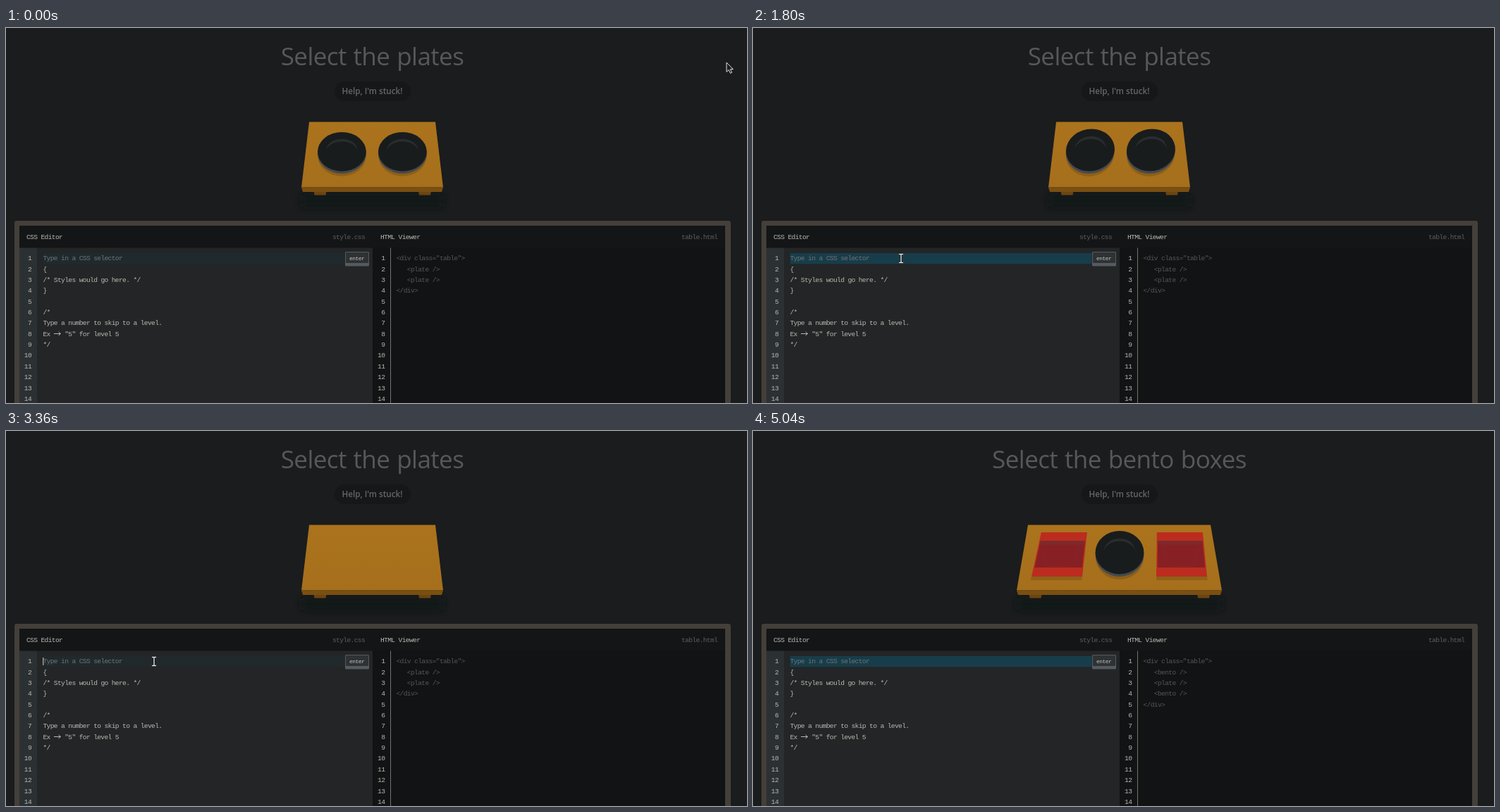
These frames come from a looping animation (1051 by 533 pixels, 5.1 s). An HTML page:

```html
<!DOCTYPE html>
<html lang="en">
<head>
<meta charset="utf-8">
<title>Select the plates</title>
<style>
html, body { margin: 0; width: 100%; height: 100%; overflow: hidden; background: #1a1c1d; }
svg { display: block; width: 100%; height: 100%; }
text { white-space: pre; }
.mono { font: 9.6px "Liberation Mono", "DejaVu Sans Mono", monospace; letter-spacing: -.64px; }
.small { font-size: 8px; letter-spacing: -.53px; }
.title { font: 35px "Open Sans", "Noto Sans", sans-serif; letter-spacing: -.55px; word-spacing: 1.3px; }
.help { font: 600 11.7px "Open Sans", "Noto Sans", sans-serif; }
</style>
</head>
<body>
<svg viewBox="0 0 1051 533" xmlns="http://www.w3.org/2000/svg">
  <defs>
    <filter id="soft" x="-20%" y="-150%" width="140%" height="400%"><feGaussianBlur stdDeviation="5"/></filter>
    <linearGradient id="wood" x1="0" y1="0" x2="0" y2="1">
      <stop offset="0" stop-color="#ab731c"/><stop offset="1" stop-color="#a66f1c"/>
    </linearGradient>
    <g id="plate">
      <ellipse cy="-27" rx="34" ry="31" fill="#8f5f17"/>
      <ellipse cy="-31.5" rx="34.5" ry="31.5" fill="#454a4e"/>
      <ellipse cy="-34.3" rx="34.4" ry="30.7" fill="#191c1d"/>
      <path d="M-22.5 -37C-19 -60 19 -60 22.5 -37C15 -55 -15 -55 -22.5 -37Z" fill="#292d2e"/>
    </g>
    <g id="bento">
      <path d="M-37.5 0H34.5L34 5H-38.5Z" fill="#8f6119"/>
      <path d="M-27.5 -64.3H37.5L34.5 0H-37.5Z" fill="#bb2c1f"/>
      <path d="M-27.8 -52H35.4L33.6 -13.3H-33.9Z" fill="#862024"/>
      <path d="M-27.8 -52H35.4L35.1 -46.5H-28.7Z" fill="#7d2a2c"/>
      <path d="M-26 -45L-16 -15H17L29 -45" fill="none" stroke="#8d2529" stroke-width=".7"/>
    </g>
    <path id="ibar" d="M-3 -6H3M0 -6V6M-3 6H3"/>
  </defs>
  <rect width="1051" height="533" fill="#1a1c1d"/>
  <text id="title" class="title" x="519.5" y="53" text-anchor="middle" fill="#56585a"></text>
  <rect x="466" y="76" width="108" height="28" rx="14" fill="#151718"/>
  <text class="help" x="519.5" y="94" text-anchor="middle" fill="#656769">Help, I'm stuck!</text>
  <g id="table"></g>
  <g id="items"></g>
  <rect x="12" y="274" width="1016" height="270" rx="3" fill="#443f39"/>
  <rect x="19" y="281" width="1001" height="252" fill="#131516"/>
  <rect x="19" y="312.5" width="25" height="221" fill="#2b3033"/>
  <rect x="44" y="312.5" width="476" height="221" fill="#232526"/>
  <rect x="520" y="312.5" width="500" height="221" fill="#111314"/>
  <rect x="545" y="312.5" width="1" height="221" fill="#77746c"/>
  <rect id="glow" x="52.5" y="320" width="428" height="15.3" fill="#17414f"/>
  <g id="code"></g>
  <g id="html"></g>
  <text id="input" class="mono" x="52.5" y="330.3"></text>
  <rect id="caret" y="322" width="1" height="11" fill="#d8d8d0"/>
  <g id="enter">
    <rect x="481" y="318" width="34" height="20.5" rx="1.5" fill="#555b5f"/>
    <rect x="482" y="319" width="32" height="15" rx="1" fill="#2e3234"/>
    <text class="mono small" x="487" y="329.5" fill="#c2c2ba">enter</text>
  </g>
  <path id="arrow" d="M0 0V13.4L3.1 10.5L5.4 15.3L7.6 14.3L5.4 9.6H9.4Z" fill="#191b1c" stroke="#e2e2e2"/>
  <g id="beam" fill="none">
    <use href="#ibar" stroke="#0b0c0c" stroke-width="3"/>
    <use href="#ibar" stroke="#e8e8e8" stroke-width="1.4"/>
  </g>
</svg>
<script>
const LOOP = 5100, STEP = 60, LINE = 15.35;
const ENTER = 2940, LOAD = 3960, SWAY = 484;
const LIGHT = '#b9b9b1', DIM = '#54585a', FILE = '#5c6061';
const $ = id => document.getElementById(id);
const clamp = v => Math.max(0, Math.min(1, v));
const span = (t, a, b) => clamp((t - a) / (b - a));
const ease = u => u * u * (3 - 2 * u);
const mix = (a, b, u) => a + (b - a) * u;
const show = (el, on) => el.setAttribute('visibility', on ? 'visible' : 'hidden');
const mono = (s, x, y, fill, anchor = 'start') =>
  `<text class="mono" x="${x}" y="${y}" fill="${fill}" text-anchor="${anchor}">${
    String(s).replace(/</g, '&lt;').replace(/>/g, '&gt;')}</text>`;
const rowY = i => 330.3 + i * LINE;

const levels = [
  { title: 'Select the plates', top: [430, 609], bottom: [419, 620], wanted: 'plate',
    items: [['plate', 476.4], ['plate', 562.4]] },
  { title: 'Select the bento boxes', top: [390, 649], bottom: [374, 665], wanted: 'bento',
    items: [['bento', 432.5], ['plate', 520], ['bento', 606.5, -1]] }
];

function buildEditor() {
  const lines = ['', '{', '/* Styles would go here. */', '}', '', '/*',
    'Type a number to skip to a level.', 'Ex', '*/'];
  let out = mono('CSS Editor', 29, 300, LIGHT) + mono('style.css', 463, 300, FILE)
    + mono('HTML Viewer', 531, 300, LIGHT) + mono('table.html', 958, 300, FILE);
  for (let i = 0; i < 14; i++) {
    out += mono(i + 1, 36, rowY(i), LIGHT, 'end') + mono(i + 1, 537.3, rowY(i), LIGHT, 'end');
    if (lines[i]) out += mono(lines[i], 52.5, rowY(i), LIGHT);
  }
  out += mono('"5" for level 5', 83.2, rowY(7), LIGHT);
  out += `<path d="M68 434.5H77M74.5 432L77.5 434.5L74.5 437" fill="none" stroke="${LIGHT}"/>`;
  $('code').innerHTML = out;
}

function buildLevel({ title, top: [a, b], bottom: [c, d], items }) {
  const leg = x => `<path d="M${x} 232H${x + 18}L${x + 17} 237.5H${x + 1}Z" fill="#6b4510"/>`;
  $('title').textContent = title;
  $('table').innerHTML =
    `<rect x="${c}" y="238" width="${d - c}" height="16" fill="#101213" opacity=".8" filter="url(#soft)"/>`
    + leg(c + 17.5) + leg(d - 35)
    + `<path d="M${a} 133.5H${b}L${d} 226.5H${c}Z" fill="url(#wood)"/>`
    + `<path d="M${c} 226.5H${d}L${d - 2} 233H${c + 2}Z" fill="#7a4f12"/>`;
  $('items').innerHTML = items.map(([kind, , flip = 1]) =>
    `<g><use href="#${kind}" transform="scale(${flip} 1)"/></g>`).join('');
  const tags = ['<div class="table">', ...items.map(([kind]) => `   <${kind} />`), '</div>'];
  $('html').innerHTML = tags.map((s, i) => mono(s, 553.5, rowY(i), DIM)).join('');
}

// Lean and squash of the pieces to be picked
function sway(phase, amount) {
  const a = 2 * Math.PI * phase;
  return {
    lean: -Math.sin(a) * amount,
    tall: 1 - (.02 + .072 * Math.cos(a) ** 2) * amount
  };
}

function popScale(u) {
  return u < .55 ? 1.1 * ease(u / .55) : mix(1.1, 1, ease((u - .55) / .45));
}

function drawItems(t, level) {
  level.items.forEach(([kind, x], i) => {
    let size = 1, y = 207, alpha = 1, pose = { lean: 0, tall: 1 };
    if (level === levels[0]) {
      const up = ease(span(t, ENTER, 3240));
      pose = sway(t / SWAY, 1 - span(t, ENTER, ENTER + 60));
      size = mix(1, .6, up);
      y = mix(207, 66, up);
      alpha = 1 - span(t, 3180, 3330);
    } else {
      size = popScale(span(t, LOAD - 20, 4460));
      y = 175 + 32 * size;
      if (kind === level.wanted) pose = sway((t - 5040) / SWAY + .75, span(t, 4440, 4560));
    }
    const g = $('items').children[i];
    g.setAttribute('transform',
      `matrix(${size} 0 ${-.06 * pose.lean * size} ${size * pose.tall} ${x} ${y})`);
    g.setAttribute('opacity', alpha);
  });
}

// Stops of the pointer: time, x, y
const path = [[0, 1022, 49], [480, 217, 336], [600, 217, 336], [840, 210, 327],
  [3840, 210, 327], [4260, 907, 210], [4560, 1062, 66]];

function drawPointer(t) {
  let i = 0;
  while (i < path.length - 2 && t >= path[i + 1][0]) i++;
  const [t0, x0, y0] = path[i], [t1, x1, y1] = path[i + 1];
  const u = ease(span(t, t0, t1)), x = mix(x0, x1, u), y = mix(y0, y1, u);
  const inField = x > 52 && x < 480 && y > 320 && y < 335;
  $('arrow').setAttribute('transform', `translate(${x} ${y})`);
  $('beam').setAttribute('transform', `translate(${x} ${y + .5})`);
  show($('arrow'), !inField && t < 4600);
  show($('beam'), inField);
}

function glowAt(t) {
  if (t >= 3360 && t < 3780) return t < 3600 ? .2 : .35;
  const start = t < ENTER ? 170 : 4520;
  return Math.sin(Math.PI * (t - start) / 1100) ** 2;
}

function drawInput(t) {
  const typing = t >= 1860 && t < ENTER;
  const n = typing ? Math.min(5, 1 + Math.floor((t - 1860) / 120)) : 0;
  $('input').textContent = n ? 'plate'.slice(0, n) : 'Type in a CSS selector';
  $('input').setAttribute('fill', n ? LIGHT : '#6e7476');
  $('glow').setAttribute('opacity', n ? 0 : .88 * glowAt(t));
  $('caret').setAttribute('x', 52.3 + n * 5.2);
  show($('caret'), (t >= 960 && t < 1500) || (t >= 1860 && t < 2880) || (t >= ENTER && t < 3600));
  const press = Math.sin(Math.PI * span(t, ENTER, 3350));
  $('enter').setAttribute('transform', `translate(0 ${2 * press})`);
}

let current;
function draw(t) {
  const level = levels[t < LOAD ? 0 : 1];
  if (level !== current) buildLevel(current = level);
  drawItems(t, level);
  drawInput(t);
  drawPointer(t);
}

function frame(now) {
  draw(Math.floor(now % LOOP / STEP) * STEP);
  requestAnimationFrame(frame);
}

buildEditor();
draw(0);
requestAnimationFrame(frame);
</script>
</body>
</html>
```
